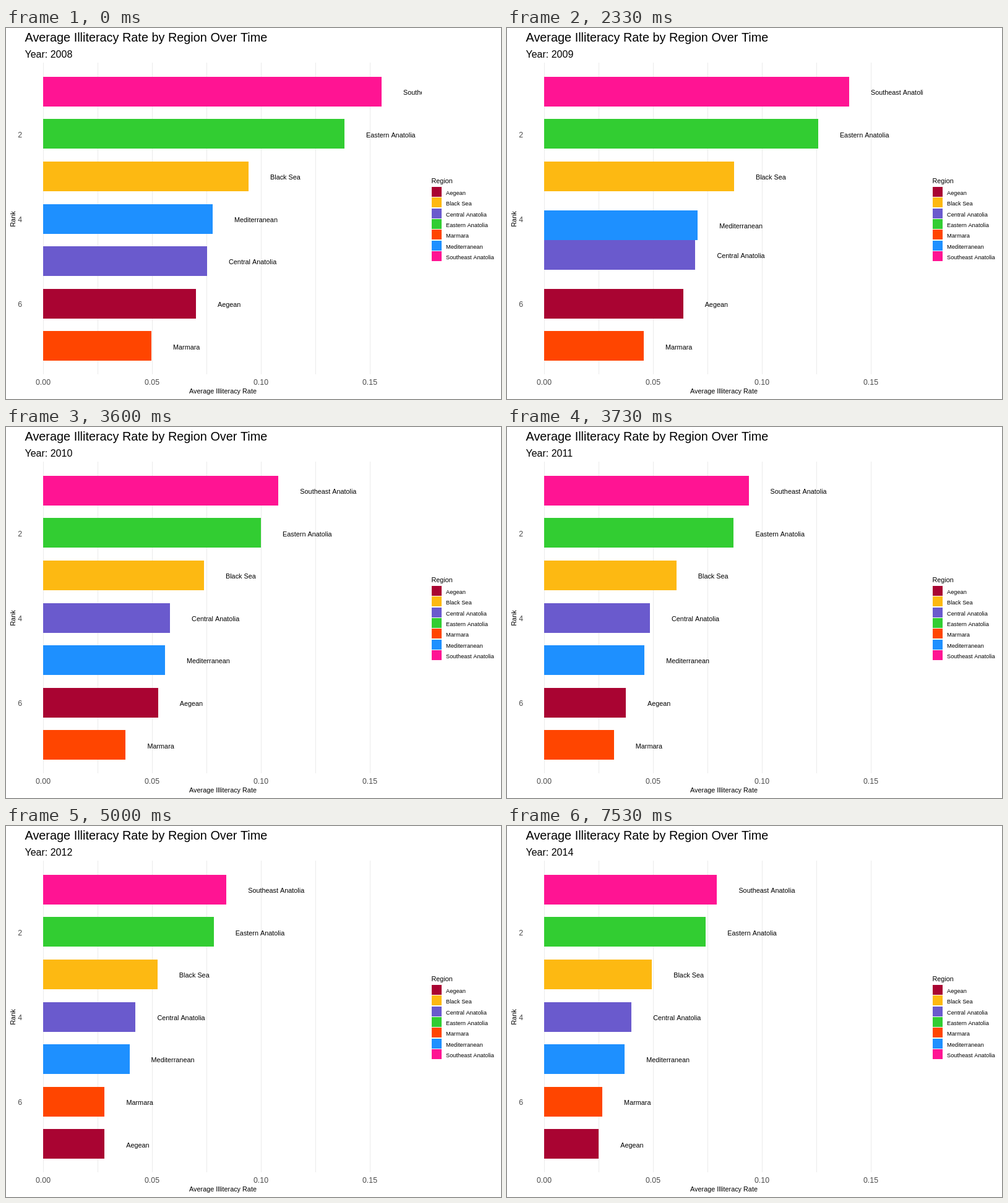
These frames come from a looping animation (800x600 px, 8 s). An HTML page with a canvas:

```html
<!DOCTYPE html>
<html lang="en">
<head>
<meta charset="utf-8">
<title>Average Illiteracy Rate by Region</title>
<style>
  html, body { margin: 0; width: 100%; height: 100%; overflow: hidden; background: #fff; }
  canvas { display: block; }
</style>
</head>
<body>
<canvas id="stage" width="800" height="600"></canvas>
<script>
const ctx = document.getElementById('stage').getContext('2d');

const LOOP = 8000, FPS = 15, FIRST_YEAR = 2008, LAST = 6;
const PERIOD = 19, HOLD = 15, STEPS = 3; // in ticks of 1/15 s
const LEFT = 60, PANEL_RIGHT = 672, ROW = 68.55;

// Bar length in pixels at the start, after two years and at the end
const regions = [
  { name: 'Aegean', color: '#a90432', start: 247, mid: 195, end: 88 },
  { name: 'Black Sea', color: '#fdb912', start: 332, mid: 268, end: 174 },
  { name: 'Central Anatolia', color: '#6a5acd', start: 265, mid: 211, end: 141 },
  { name: 'Eastern Anatolia', color: '#32cd32', start: 487, mid: 360, end: 261 },
  { name: 'Marmara', color: '#ff4500', start: 175, mid: 137, end: 94 },
  { name: 'Mediterranean', color: '#1e90ff', start: 274, mid: 203, end: 130 },
  { name: 'Southeast Anatolia', color: '#ff1493', start: 547, mid: 389, end: 279 }
];

const mix = (a, b, p) => a + (b - a) * p;
const ease = p => p < 0.5 ? 4 * p ** 3 : 1 - 4 * (1 - p) ** 3;

// Bell-shaped decline, bent through the middle value by a bump that peaks at year 2
const decline = year => Math.exp(-((year / 2.55) ** 2.2));
const bump = year => (year / 2 * Math.exp(1 - year / 2)) ** 12;

function barLength({ start, mid, end }, year) {
  const bend = mid - mix(end, start, decline(2));
  return mix(end, start, decline(year)) + bend * bump(year);
}

const rank = (region, year) =>
  regions.filter(r => barLength(r, year) > barLength(region, year)).length;

function text(str, x, y, size, color = '#000', align = 'left') {
  ctx.font = `${size}px "Liberation Sans", Arial, sans-serif`;
  ctx.fillStyle = color;
  ctx.textAlign = align;
  ctx.fillText(str, x, y);
}

function rect(x, y, w, h, color) {
  ctx.fillStyle = color;
  ctx.fillRect(Math.round(x), Math.round(y), Math.round(w), Math.round(h));
}

function drawAxes() {
  for (let i = 0; i < 7; i++) rect(LEFT + 88 * i, 56, 1, 504, '#ebebeb');
  for (let i = 0; i < 4; i++) {
    text((i * 0.05).toFixed(2), LEFT + 176 * i, 577, 12.3, '#4d4d4d', 'center');
  }
  for (let n = 2; n <= 6; n += 2) {
    text(n, 26, Math.round(108.5 + ROW * (n - 1)), 12.3, '#4d4d4d', 'right');
  }
  text('Average Illiteracy Rate', 350.5, 591, 10.85, '#000', 'center');
  ctx.save();
  ctx.translate(15, 309);
  ctx.rotate(-Math.PI / 2);
  text('Rank', 0, 0, 11, '#000', 'center');
  ctx.restore();
}

function drawLegend() {
  text('Region', 687.5, 251, 10.85);
  regions.forEach(({ name, color }, i) => {
    const y = Math.round(257.2 + 17.28 * i);
    rect(688, y, 16, 16, color);
    text(name, 711, y + 13, 9.25);
  });
}

function drawBars(year, p) {
  const next = Math.min(year + 1, LAST);
  const bars = regions.map(r => ({
    ...r,
    length: mix(barLength(r, year), barLength(r, next), p),
    row: ROW * mix(rank(r, year), rank(r, next), p)
  }));
  for (const b of bars) rect(LEFT, 78.9 + b.row, b.length, 48, b.color);
  ctx.save();
  ctx.beginPath();
  ctx.rect(0, 0, PANEL_RIGHT, 600);
  ctx.clip();
  for (const b of bars) text(b.name, LEFT + b.length + 35, Math.round(108.2 + b.row), 10.85);
  ctx.restore();
}

function draw(now) {
  // Ticks start up to 4 ms early, as delays are whole hundredths of a second
  const tick = Math.floor((now % LOOP + 4) * FPS / 1000) % (LOOP * FPS / 1000);
  const year = Math.floor((tick + 1) / PERIOD);
  const p = Math.max(0, tick - PERIOD * year - HOLD) / STEPS;

  rect(0, 0, 800, 600, '#fff');
  text('Average Illiteracy Rate by Region Over Time', 30.5, 22, 19.87);
  text(`Year: ${FIRST_YEAR + year + Math.round(p)}`, 30.5, 48, 16);
  drawAxes();
  drawBars(year, ease(p));
  drawLegend();
  requestAnimationFrame(() => draw(performance.now()));
}

draw(performance.now());
</script>
</body>
</html>
```
